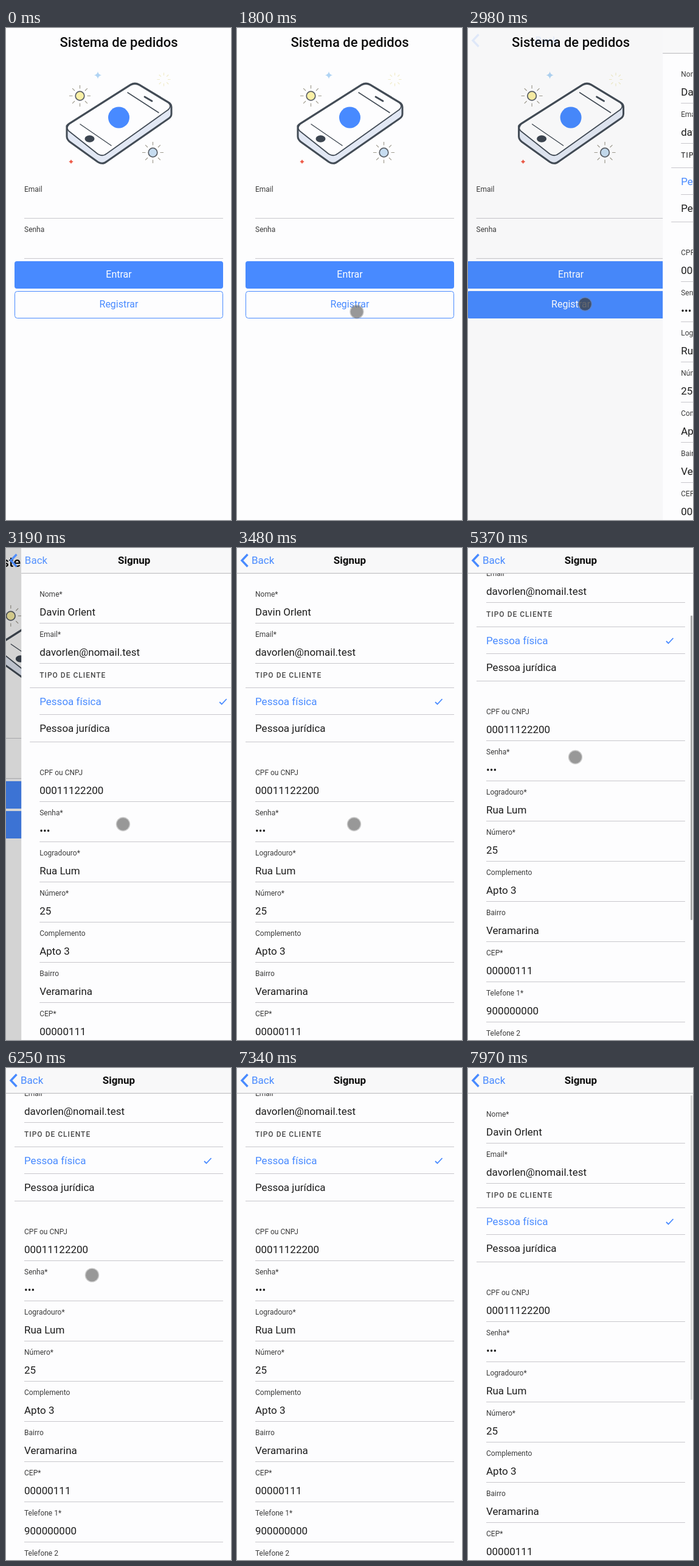
Animation, 370 px wide and 808 px high, one loop 8 s. Source, as an HTML page:

```html
<!DOCTYPE html>
<html lang="pt">
<head>
<meta charset="utf-8">
<title>Sistema de pedidos</title>
<style>
  html, body { margin: 0; width: 100%; height: 100%; overflow: hidden; background: #fdfdfe; }
  svg { display: block; width: 100vw; height: 100vh; }
  text { font: 17px Roboto, sans-serif; fill: #1c1c1c; white-space: pre; }
  .label { font-size: 12px; fill: #3c3c3c; }
  .caps { font-size: 12px; font-weight: 500; letter-spacing: 1px; fill: #484848; }
  .title { font-size: 22px; font-weight: 500; fill: #0c0c0c; }
  .bar { font-weight: 600; fill: #0c0c0c; }
  .btn { font-size: 16px; }
  .mid { text-anchor: middle; }
  .blue { fill: #488aff; }
  .rule { stroke: #c8c7cc; }
  .ink { stroke: #434c56; fill: none; stroke-linecap: round; stroke-linejoin: round; }
</style>
</head>
<body>
<svg id="stage" viewBox="0 0 370 808"></svg>
<script>
const LOOP = 8000;
const BLUE = '#488aff';

const text = (x, y, s, cls = '') => `<text x="${x}" y="${y}" class="${cls}">${s}</text>`;
const rule = (y, x = 30) => `<path class="rule" d="M${x} ${y}H357"/>`;
const field = (y, label, value = '') =>
  text(30, y - 43.5, label, 'label') + text(30, y - 12.5, value) + rule(y);

function rays(x, y, r0, r1, color) {
  let d = '';
  for (let i = 0; i < 8; i++) {
    const c = Math.cos(i * Math.PI / 4), s = Math.sin(i * Math.PI / 4);
    d += `M${x + r0 * c} ${y + r0 * s}L${x + r1 * c} ${y + r1 * s}`;
  }
  return `<path d="${d}" stroke="${color}" stroke-width="1.2"/>`;
}
const sun = (x, y, fill) => rays(x, y, 12, 17.5, '#a09c90') +
  `<circle cx="${x}" cy="${y}" r="7.3" fill="${fill}" stroke="#5a5f66" stroke-width="1.7"/>`;
const star = (x, y, r, fill) =>
  `<path fill="${fill}" d="M${x} ${y - r}Q${x + 1} ${y - 1} ${x + r} ${y}Q${x + 1} ${y + 1} ${x} ${y + r}Q${x - 1} ${y + 1} ${x - r} ${y}Q${x - 1} ${y - 1} ${x} ${y - r}Z"/>`;

const phone = `
  <path class="ink" stroke-width="3" style="fill:#e2e8f4"
    d="M100 161Q101 159 104 157L205 93Q212 89 219 93L267 122Q272 125 272 130V141Q272 146 267 149L166 219Q159 225 151 220L105 187Q100 183 100 178Z"/>
  <path class="ink" stroke-width="1.8" style="fill:#fdfdfe"
    d="M103 169Q98 164 104 158L205 94Q212 90 219 94L267 123Q273 128 267 134L166 206Q159 212 151 207Z"/>
  <path class="ink" stroke-width="1.5" d="M200 106L251 139M122 158L173 193"/>
  <path class="ink" stroke-width="2.800" d="M228 113L240 120"/>
  <ellipse cx="137.500" cy="182" rx="8" ry="5.800" fill="#3c4550"/>
  <circle cx="185.500" cy="147" r="17.500" fill="${BLUE}"/>`;

const login = text(185.5, 31, 'Sistema de pedidos', 'title mid') + phone +
  sun(121.5, 111.5, '#fbf0a6') + sun(241.5, 204.5, '#c6dcf0') +
  rays(259.5, 84.5, 6.5, 11, '#f0ebc8') +
  star(151, 77.5, 6, '#b0d4f4') + star(107, 219.5, 3.6, '#ee5a48') +
  field(312.5, 'Email') + field(378.5, 'Senha') +
  `<rect x="14" y="383" width="343" height="45" rx="4" fill="${BLUE}"/>` +
  `<text x="185.500" y="410" class="btn mid" style="fill:#fff">Entrar</text>` +
  `<rect id="reg" x="14.500" y="432.500" width="342" height="44" rx="4" stroke="${BLUE}"/>` +
  `<text id="regText" x="185.500" y="459" class="btn mid">Registrar</text>`;

const form = [
  [123.5, 'Nome*', 'Davin Orlent'],
  [189.5, 'Email*', 'davorlen@nomail.test'],
  [416.5, 'CPF ou CNPJ', '00011122200'],
  [482.5, 'Senha*', '•••'],
  [548.5, 'Logradouro*', 'Rua Lum'],
  [614.5, 'Número*', '25'],
  [680.5, 'Complemento', 'Apto 3'],
  [746.5, 'Bairro', 'Veramarina'],
  [812.5, 'CEP*', '00000111'],
  [878.5, 'Telefone 1*', '900000000'],
  [944.5, 'Telefone 2', '']
].map(f => field(...f)).join('') +
  text(30, 213, 'TIPO DE CLIENTE', 'caps') + rule(229.5, 14) +
  text(30, 258, 'Pessoa física', 'blue') + rule(273.5) +
  text(30, 302, 'Pessoa jurídica') + rule(318.5, 14) +
  `<path d="M326 253l3.500 3.500L337.500 248" fill="none" stroke="${BLUE}" stroke-width="1.800"/>`;

document.getElementById('stage').innerHTML = `
  <rect width="370" height="808" fill="#fdfdfe"/>
  <g id="login">${login}</g>
  <rect id="dim" width="370" height="808"/>
  <g id="signup">
    <rect width="370" height="808" fill="#fdfdfe"/>
    <g id="form">${form}</g>
    <rect id="thumb" x="366" width="3" height="500" rx="1" fill="#a8a8a8"/>
    <rect width="370" height="41" fill="#f8f8f9"/>
    <path d="M0 41.500H370" stroke="#b8b8bc"/>
    ${text(185.5, 26, 'Signup', 'bar mid')}
  </g>
  <g id="back">
    <path d="M17.500 10.500L8 20.500L17.500 30.500" fill="none" stroke="${BLUE}" stroke-width="3.400"/>
    <g id="backText">${text(24, 26, 'Back', 'blue')}</g>
  </g>
  <g id="dot">
    <circle r="11.700" fill="#808080" opacity=".4"/>
    <circle id="core" r="10.300"/>
  </g>`;

const $ = {};
for (const el of document.querySelectorAll('[id]')) $[el.id] = el;
const set = (el, attrs) => { for (const k in attrs) el.setAttribute(k, attrs[k]); };
const shift = (el, x, y = 0) => set(el, { transform: `translate(${x} ${y})` });

const span = (t, a, b) => Math.min(1, Math.max(0, (t - a) / (b - a)));
const smooth = p => p * p * (3 - 2 * p);

// cubic-bezier(.36,.66,.04,1), solved by bisection
function pageEase(p) {
  if (p <= 0 || p >= 1) return p;
  const curve = (s, a, b) => 3 * (1 - s) * (1 - s) * s * a + 3 * (1 - s) * s * s * b + s * s * s;
  let lo = 0, hi = 1;
  for (let i = 0; i < 24; i++) {
    const s = (lo + hi) / 2;
    if (curve(s, .36, .04) < p) lo = s; else hi = s;
  }
  return curve(lo, .66, 1);
}

// pointer visits: [time, x, y]
const visits = [
  [[130, 344, 28], [550, 263.5, 631.5], [1050, 263.5, 631.5]],
  [[1220, 233.5, 581.5], [1260, 233.5, 581.5]],
  [[1800, 197, 466], [2300, 189, 452.5], [2600, 192.5, 453.5], [4360, 192.5, 453.5]],
  [[4570, 172.5, 339.5], [4910, 172.5, 339.5], [5050, 176.5, 343.5], [6150, 176.5, 343.5], [6460, 36, 330]]
];
function pointer(t) {
  const v = visits.find(v => t >= v[0][0] && t < v[v.length - 1][0]);
  if (!v) return null;
  const i = v.findIndex(k => k[0] > t), a = v[i - 1], b = v[i];
  const p = smooth(span(t, a[0], b[0]));
  return [a[1] + (b[1] - a[1]) * p, a[2] + (b[2] - a[2]) * p];
}

function draw(t) {
  const k = pageEase(span(t, 2947, 3458));
  shift($.login, -122 * k);
  shift($.signup, 370 * (1 - k));
  set($.dim, { opacity: .18 * k });
  set($.back, { opacity: k });
  shift($.backText, 100 * (1 - k));

  const active = t >= 2840;
  set($.reg, { fill: active ? BLUE : '#fdfdfe' });
  $.regText.style.fill = active ? '#fff' : BLUE;

  const y = 100 * (smooth(span(t, 5120, 5300)) - smooth(span(t, 7390, 7560)));
  shift($.form, 0, -y);
  const shown = t >= 7390 ? 1 - span(t, 7860, 8060) : t >= 5120 ? 1 - span(t, 5700, 5950) : 0;
  set($.thumb, { y: 45 + .66 * y, opacity: shown });

  const at = pointer(t);
  set($.dot, { visibility: at ? 'visible' : 'hidden' });
  if (at) shift($.dot, ...at);
  const pressed = t >= 2840 && t < 3040;
  set($.core, { fill: pressed ? '#30343c' : '#707070', opacity: pressed ? .65 : .55 });
}

const start = performance.now();
function tick() {
  draw((performance.now() - start) % LOOP);
  requestAnimationFrame(tick);
}
tick();
</script>
</body>
</html>
```
